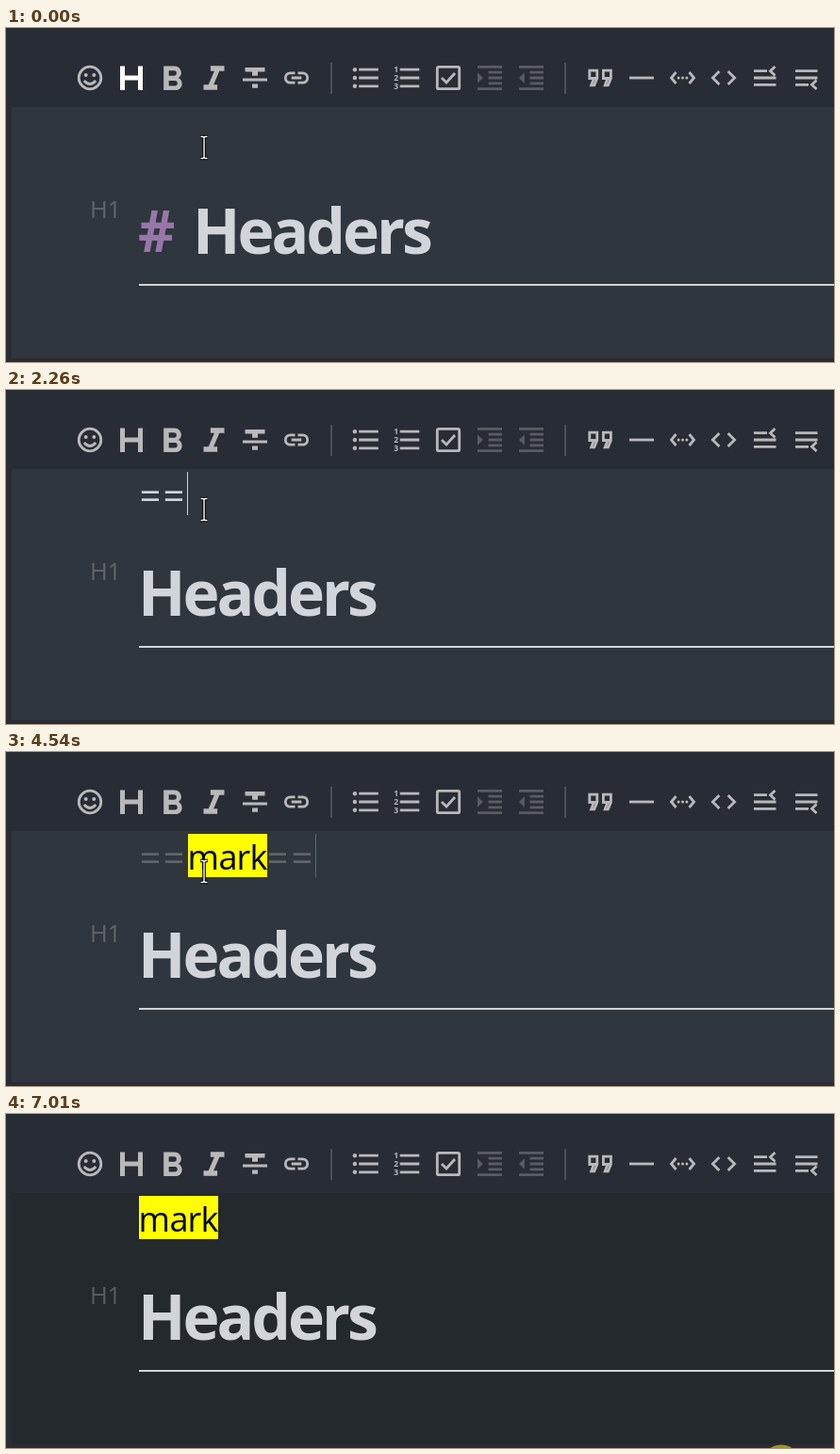
Write an HTML page that moves like this. It is 878 by 355 pixels and loops after 7.26 s.

```html
<!DOCTYPE html>
<html lang="en">
<head>
<meta charset="utf-8">
<title>Markdown editor</title>
<style>
  html, body { margin: 0; width: 100%; height: 100%; overflow: hidden; background: #282c35; }
  svg { display: block; font-family: "Open Sans", "Noto Sans", sans-serif; }
  .icon { fill: #b9b9b9; }
  .line { fill: none; stroke: #b9b9b9; stroke-width: 2.8; }
  .off { opacity: .34; }
  .dim { fill: #b9b9b9; fill-opacity: .36; }
  .text { fill: #d1d5da; }
  .head { font-size: 66px; font-weight: 700; letter-spacing: -3px; }
</style>
</head>
<body>
<svg width="878" height="355" viewBox="0 0 878 355">
  <rect id="panel" x="6" y="84" width="872" height="267"/>
  <rect y="351" width="878" height="4" fill="#2a2b33"/>
  <g id="bar"></g>
  <path d="M345 37V70M593 37V70" stroke="#50545b" stroke-width="1.8"/>
  <text class="dim" x="89" y="202" font-size="25.5" letter-spacing="-.3">H1</text>
  <text id="hash" x="140" y="238" font-size="61" font-weight="700" fill="#9876aa">#</text>
  <text id="title" class="head text" y="240">Headers</text>
  <rect class="text" x="141" y="272" width="737" height="2"/>
  <rect id="mark" y="87" width="84" height="46" fill="#ff0"/>
  <g id="typed" font-size="36"></g>
  <rect id="caret" y="87" width="1" height="46"/>
  <g id="mouse">
    <circle id="click" r="20.5" fill="#ff0" fill-opacity=".52"/>
    <g id="beam" fill="none">
      <path d="M-4-11.5H-1L0-10.5L1-11.5H4M0-10.5V10.5M-4 11.5H-1L0 10.5L1 11.5H4" stroke="#000" stroke-width="3.6"/>
      <path d="M-3.5-11.5H-1L0-10.5L1-11.5H3.5M0-10.5V10.5M-3.5 11.5H-1L0 10.5L1 11.5H3.5" stroke="#fff" stroke-width="1.4"/>
    </g>
  </g>
</svg>
<script>
const $ = id => document.getElementById(id);
const set = (el, attrs) => { for (const k in attrs) el.setAttribute(k, attrs[k]); };
const show = (id, on) => $(id).style.display = on ? '' : 'none';

// Toolbar icons, each drawn around its own centre
const line = (d, more = '') => `<path class="line" d="${d}" ${more}/>`;
const fill = (d, more = '') => `<path class="icon" d="${d}" ${more}/>`;
const dot = (x, y, r) => `<circle class="icon" cx="${x}" cy="${y}" r="${r}"/>`;
const digit = n => `<text class="icon" x="-13.8" y="${n * 8.8 - 14.6}" font-size="8.5" font-weight="700">${n}</text>`;
const rows = 'M-7.3-8.8H13.3M-7.3 0H13.3M-7.3 8.8H13.3';
const dented = arrow => `<g class="off">${line('M-13-11.6H13M-1.5-5.8H13M-1.5 0H13M-1.5 5.8H13M-13 11.6H13')}${fill(arrow)}</g>`;
const quote = 'M-3.2.5H-11.2V-7.8H-3.2V.5L-6.2 7.8H-9.4L-6.6.5';

const icons = [
  [89, '<circle class="line" r="11.8"/>' + dot(-4.3, -3, 2) + dot(4.3, -3, 2) + line('M-6.2 3Q0 10 6.2 3')],
  [133, '<path id="heading" d="M-12-12.5H-7V-2.5H7V-12.5H12V13H7V2.5H-7V13H-12z"/>'],
  [177, fill('M15.6 10.8c1-.7 1.65-1.8 1.65-2.8 0-2.26-1.75-4-4-4H7v14h7c2.1 0 3.7-1.7 3.7-3.8 0-1.5-.8-2.8-2.1-3.4zM10 6.5h3a1.5 1.5 0 0 1 0 3h-3zM13.5 15.5H10v-3h3.5a1.5 1.5 0 0 1 0 3z',
    'transform="scale(1.82) translate(-12.4 -10.8)"')],
  [220.5, fill('M-3.6-12.7H11V-7.3H5.8L-.4 7.3H3.6V12.8H-11V7.3H-5.8L.4-7.3H-3.6z')],
  [264, fill('M-10.5-11H10.5V-6.6H3V-2.2H-3V-6.6H-10.5zM-13 .6H13V3.5H-13zM-3 6.4H3V10.8H-3z')],
  [308, line('M-1.5-5.2H-6.5A5.2 5.2 0 0 0-6.5 5.2H-1.5M1.5-5.2H6.5A5.2 5.2 0 0 1 6.5 5.2H1.5M-5.3 0H5.3')],
  [381.5, [-8.8, 0, 8.8].map(y => dot(-11.6, y, 2.2)).join('') + line(rows)],
  [425, [1, 2, 3].map(digit).join('') + line(rows)],
  [469, '<rect class="line" x="-11.7" y="-11.7" width="23.4" height="23.4" rx="1.5"/>' + line('M-7 0L-2 5L7-5')],
  [513, dented('M-13-5.8L-7.2 0L-13 5.8z')],
  [557, dented('M-7.2-5.8L-13 0L-7.2 5.8z')],
  [630, line(quote) + line(quote, 'transform="translate(14.6 0)"')],
  [674, line('M-13 0H13')],
  [717.5, line('M-7-6L-12 0L-7 6M7-6L12 0L7 6') + [-4.4, 0, 4.4].map(x => dot(x, 0, 1.5)).join('')],
  [761, line('M-4.6-7L-11.6 0L-4.6 7M4.6-7L11.6 0L4.6 7')],
  [805, line('M-12-7.3H2M-12 0H11.5M-12 7.3H11.5M10.5-12L5.5-7.3L10.5-2.6')],
  [849, line('M-12-7.3H11.5M-12 0H11.5M-12 7.3H2M10.5 2.6L5.5 7.3L10.5 12')]
];
$('bar').innerHTML = icons.map(([x, art]) => `<g transform="translate(${x} 53)">${art}</g>`).join('');

const word = '==mark==';
const stops = [141, 166, 192, 225, 244, 258, 276, 302, 328];   // caret place after each key
const keys = [2110, 2260, 2980, 3210, 3420, 3590, 4370, 4540];
const blinks = [150, 710, 1240, 1710, 2110, 2810, 2980, 4140, 4370, 5070, 5390, 5920, 6400, 6930];
const moves = [
  [0, 210, 127], [5390, 275, 143], [5470, 400, 174], [5540, 523.5, 209], [5620, 655, 253], [5690, 750, 287],
  [5920, 758, 292], [6000, 778, 306], [6080, 803, 326], [6160, 820, 347], [6250, 822, 372]
];
$('typed').innerHTML = [...word].map((c, i) =>
  `<text x="${stops[i] + .5}" ${c === '=' ? 'y="127" font-size="40"' : 'y="125"'}>${c}</text>`).join('');
const glyphs = [...$('typed').children];

function draw(t) {
  const count = keys.filter(k => t >= k).length;
  const marked = t >= 4540, done = t >= 7010, raw = t < 380;
  const isSign = i => word[i] === '=';

  set($('panel'), { fill: done ? '#24292e' : '#2f363d' });
  set($('heading'), { fill: t < 560 ? '#fff' : '#b9b9b9' });
  show('hash', raw);
  set($('title'), { x: raw ? 198 : 140 });

  show('mark', marked);
  set($('mark'), { x: done ? 141 : 193 });
  set($('typed'), { transform: `translate(${done ? -52 : 0} 0)` });
  glyphs.forEach((g, i) => {
    g.style.display = i < count && !(done && isSign(i)) ? '' : 'none';
    set(g, { class: !marked ? 'text' : isSign(i) ? 'dim' : '' });
  });

  show('caret', blinks.filter(b => t >= b).length % 2);
  set($('caret'), { x: stops[count], class: marked ? 'dim' : 'text' });

  const [, x, y] = moves.filter(m => t >= m[0]).pop();
  set($('mouse'), { transform: `translate(${x} ${y})` });
  show('beam', t < 6250);
  show('click', t >= 150 && raw || done);
}

function tick() {
  draw(performance.now() % 7260);
  requestAnimationFrame(tick);
}
tick();
</script>
</body>
</html>
```
